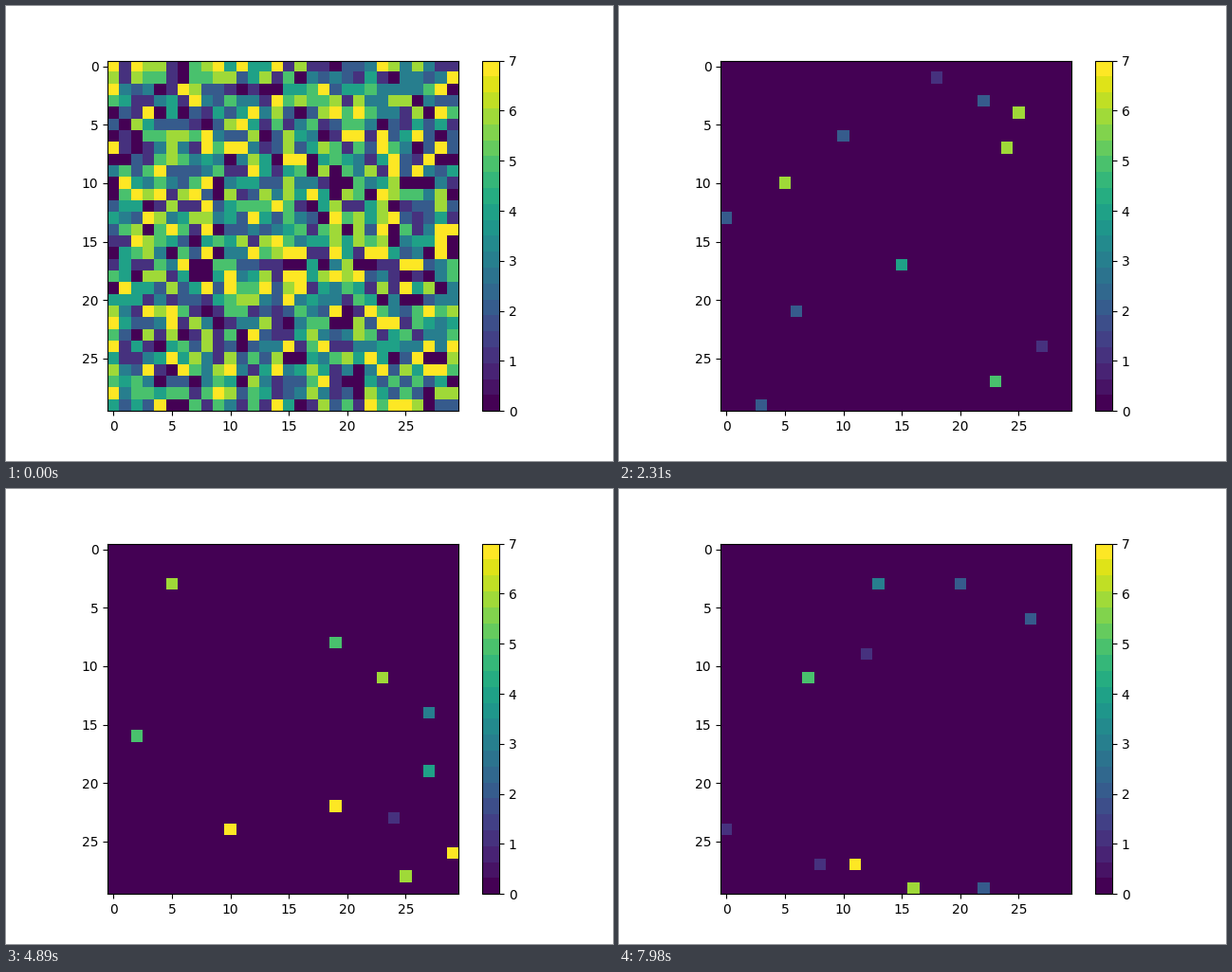
A matplotlib script that plays this animation: 640 by 480 pixels, repeating every 8000 ms.

```python
import numpy as np
import matplotlib.pyplot as plt
from matplotlib.animation import FuncAnimation

SIZE = 30          # cells per side
STATES = 8         # cell values 0..7
SPARK = 0.012      # chance that a cell lights up in one step
FRAMES = 267
LOOP_MS = 8000

np.random.seed(17)


def soup():
    """Every cell gets any value with equal chance."""
    return np.random.randint(0, STATES, (SIZE, SIZE))


def sparks():
    """An empty field with a few lit cells."""
    lit = np.random.random((SIZE, SIZE)) < SPARK
    return np.where(lit, np.random.randint(1, STATES, (SIZE, SIZE)), 0)


grids = [soup()] + [sparks() for _ in range(FRAMES - 1)]

fig, ax = plt.subplots(figsize=(6.4, 4.8), dpi=100)
# 22 bands keep every whole value on its exact viridis colour
cmap = plt.get_cmap("viridis", 3 * (STATES - 1) + 1)
image = ax.imshow(grids[0], cmap=cmap, vmin=0, vmax=STATES - 1,
                  interpolation="nearest")
fig.colorbar(image, ax=ax, ticks=range(STATES))


def update(step):
    image.set_data(grids[step])
    return (image,)


anim = FuncAnimation(fig, update, frames=FRAMES, interval=LOOP_MS / FRAMES,
                     init_func=lambda: update(0), repeat=True, repeat_delay=0)
plt.show()
```
